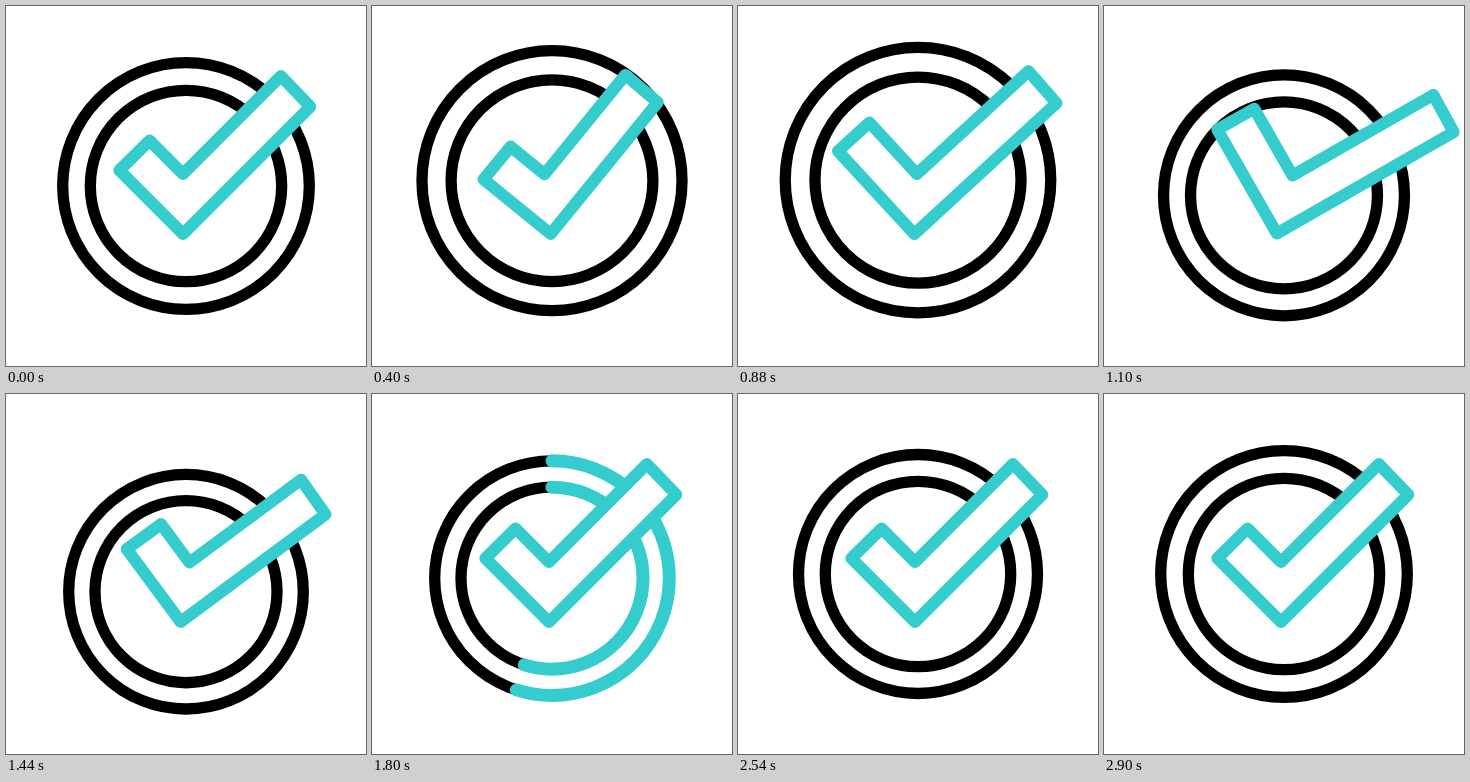
These frames come from a looping animation (360x360 px, 3.04 s). An HTML page with a canvas:

```html
<!DOCTYPE html>
<html lang="en">
<head>
<meta charset="utf-8">
<title>Check badge</title>
<style>
html, body { margin: 0; width: 100%; height: 100%; overflow: hidden; background: #fff; }
canvas { display: block; width: 360px; height: 360px; }
</style>
</head>
<body>
<canvas id="stage" width="360" height="360"></canvas>
<script>
const ctx = document.getElementById('stage').getContext('2d');
const LOOP = 3040;
const TEAL = '#35cccd';
const RAD = Math.PI / 180;
const START = 145;   // rest ends
const WINDUP = 700;  // rings largest, check pulled back

// Smooth progress from 0 to 1 between two times
function ease(t, from, to) {
  const u = Math.min(1, Math.max(0, (t - from) / (to - from)));
  return u * u * (3 - 2 * u);
}

function arc(y, r, from, to, width, color) {
  ctx.beginPath();
  ctx.arc(180, y, r, (from - 90) * RAD, (to - 90) * RAD);
  ctx.lineWidth = width;
  ctx.strokeStyle = color;
  ctx.stroke();
}

function drawRings(t) {
  const grow = ease(t, START, WINDUP);
  const radius = 123.3 + 15.2 * grow - 21.2 * ease(t, WINDUP, 1230) + 6 * ease(t, 2300, 2890);
  const y = 180 - 12 * grow + 30.8 * ease(t, WINDUP, 1335) - 18.8 * ease(t, 1345, 2000);
  const head = 360 * ease(t, 1460, 2100);
  const tail = 360 * ease(t, 1880, 2520);
  for (const r of [radius, radius * 0.776]) {
    arc(y, r, 0, 360, 11.3, '#000');
    if (head > tail) arc(y, r, tail, head, 13, TEAL);
  }
}

function drawCheck(t) {
  const pull = ease(t, START, WINDUP);
  const tilt = -13.2 * pull + 28.4 * ease(t, WINDUP, 1040) - 15.2 * ease(t, 1140, 1790);
  const swing = ease(t, WINDUP, 980);
  const settle = ease(t, 980, 1475);
  const right = -23.5 * pull + 51.5 * swing - 28 * settle;
  const left = -8 * pull + 43 * swing - 35 * settle;

  // Both arms leave the corner at 45 degrees
  const low = 16, high = -44;
  const corner = (base, len, side) =>
    ctx.lineTo(side * len * Math.SQRT1_2, base - len * Math.SQRT1_2);

  ctx.save();
  ctx.translate(177, 212);
  ctx.rotate(tilt * RAD);
  ctx.beginPath();
  corner(low, 0, 1);
  corner(low, 180 + right, 1);
  corner(high, 138.5 + right, 1);
  corner(high, 0, 1);
  corner(high, 47.3 + left, -1);
  corner(low, 90 + left, -1);
  ctx.closePath();
  ctx.fillStyle = '#fff';
  ctx.fill();
  ctx.lineWidth = 12;
  ctx.strokeStyle = TEAL;
  ctx.stroke();
  ctx.restore();
}

function draw(t) {
  ctx.fillStyle = '#fff';
  ctx.fillRect(0, 0, 360, 360);
  ctx.lineCap = ctx.lineJoin = 'round';
  drawRings(t);
  drawCheck(t);
}

const start = performance.now();
function tick() {
  draw((performance.now() - start) % LOOP);
  requestAnimationFrame(tick);
}
tick();
</script>
</body>
</html>
```
